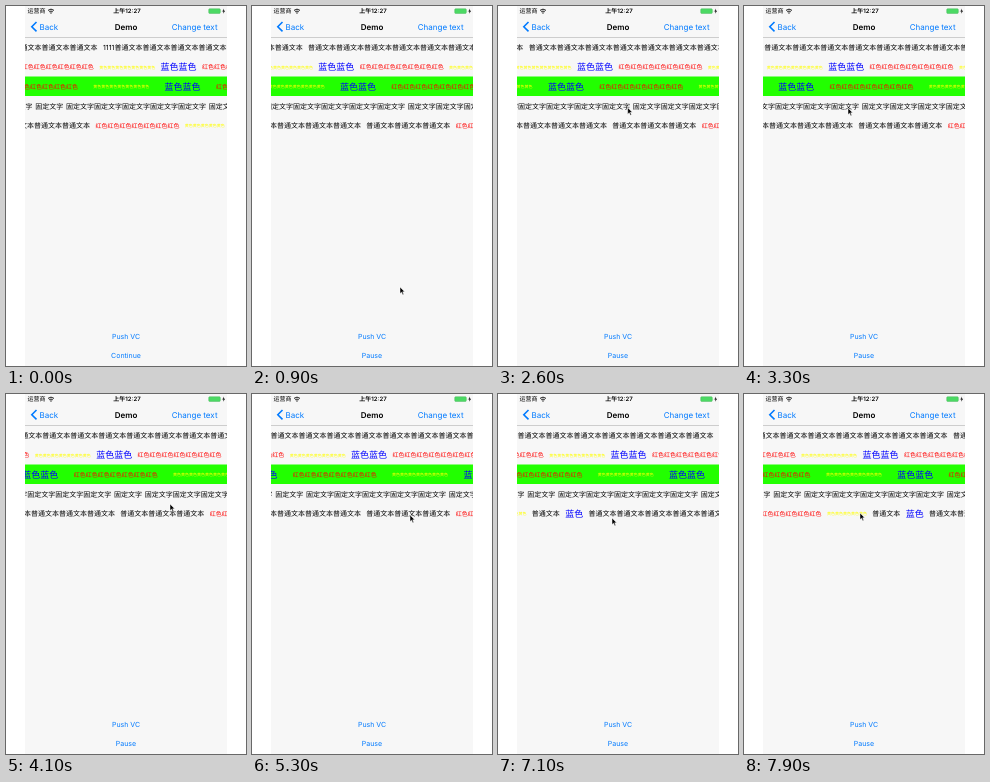
Write an HTML page that moves like this. It is 240 px wide and 360 px high and loops after 8000 ms.

```html
<!DOCTYPE html>
<html lang="zh-CN">
<head>
<meta charset="utf-8">
<style>
html, body { margin: 0; width: 100%; height: 100%; overflow: hidden; background: #fff; }
svg { display: block; width: 240px; height: 360px; }
text { font-family: Inter, "Noto Sans CJK SC", "Noto Sans CJK JP", "Noto Sans CJK", sans-serif; text-rendering: geometricPrecision; white-space: pre; }
.link { fill: #007aff; }
</style>
</head>
<body>
<svg viewBox="0 0 240 360">
  <clipPath id="screen"><rect x="19" width="202" height="360"/></clipPath>
  <g clip-path="url(#screen)">
    <rect x="19" width="202" height="360" fill="#f7f7f7"/>
    <rect x="19" y="31" width="202" height=".6" fill="#b2b2b2"/>
    <rect x="19" y="70.5" width="202" height="19.5" fill="#2f0"/>
    <g id="rows"></g>
    <text x="21.5" y="7.2" font-size="6">运营商</text>
    <g fill="none" stroke="#000" stroke-width=".9">
      <path d="M42 4.4q3-2.6 6 0M43.2 5.8q1.8-1.6 3.6 0"/>
      <circle cx="45" cy="7" r=".3"/>
    </g>
    <text x="121" y="7.2" font-size="6" font-weight="600" text-anchor="middle">上午12:27</text>
    <rect x="202.7" y="2.7" width="11.6" height="4.8" rx="1" fill="#4cd964" stroke="#3fae52" stroke-width=".4"/>
    <path d="M214.8 4.2v1.8q.9-.9 0-1.8" fill="#4cd964"/>
    <path d="M218 2.5l-1.7 3h1.3l-.5 2.3 2-3h-1.4z"/>
    <path d="M30.5 16l-4.7 4.7 4.7 4.7" fill="none" stroke="#007aff" stroke-width="1.6"/>
    <g font-size="8">
      <text class="link" x="33.5" y="23.5">Back</text>
      <text x="120" y="23.5" font-weight="600" text-anchor="middle">Demo</text>
      <text class="link" x="211.5" y="23.5" text-anchor="end">Change text</text>
    </g>
    <g class="link" font-size="7" text-anchor="middle">
      <text x="120" y="333.2">Push VC</text>
      <text id="toggle" x="120" y="352.2"></text>
    </g>
    <path id="cursor" d="M0 0v6.6l1.6-1.4 1.1 2.5 1.1-.5-1.1-2.4h2z" stroke="#fff" stroke-width=".5"/>
  </g>
</svg>
<script>
const $ = id => document.getElementById(id);
const LEFT = 19, LOOP = 8000, STEP = 100, SPEED = 7.46, SWIPE = 750;

function add(parent, tag, attrs) {
  const el = document.createElementNS('http://www.w3.org/2000/svg', tag);
  for (const k in attrs) el.setAttribute(k, attrs[k]);
  return parent.appendChild(el);
}

const words = (str, size, fill) => n => [str.repeat(n), size, fill];
const black = words('普通文本', 7, '#000');
const fixed = words('固定文字', 7, '#000');
const red = words('红色', 6, '#f00');
const yellow = words('黄色', 4, '#ff0');
const blue = words('蓝色', 9, '#00f');

// Endless marquee; returns a setter for the x of its first item, null hides it.
function marquee(cy, gap, items) {
  const row = add($('rows'), 'g', {});
  let x = 0, period;
  for (let copy = 0; copy < 3; copy++) {
    for (const [str, size, fill] of items) {
      const el = add(row, 'text', { x, y: cy + size * .38, 'font-size': size, fill });
      el.textContent = str;
      x += el.getComputedTextLength() + gap;
    }
    period = period || x;
  }
  return pos => {
    const p = ((pos - LEFT) % period + period) % period + LEFT - period;
    row.setAttribute('transform', `translate(${p})`);
    row.style.display = pos === null ? 'none' : '';
  };
}

const plain = marquee(41.2, 5.4, [black(9)]);
const changed = marquee(41.2, 5.4, [['1111' + black(9)[0], 7, '#000']]);
const rightward = marquee(61, 5.4, [blue(2), red(7), yellow(7)]);
const green = marquee(80.4, 15.3, [blue(2), red(7), yellow(7)]);
const dragged = marquee(100, 2.7, [fixed(5), fixed(5), fixed(1)]);
const mixed = marquee(119.6, 5.4, [black(3), red(7), yellow(5), black(1), blue(1), black(7)]);

function ease(u) {
  u = Math.min(1, Math.max(0, u));
  return u * u * (3 - 2 * u);
}

// Sum of equal-length swipes, each [start, distance].
const swiped = (list, t) =>
  list.reduce((sum, [from, dist]) => sum + dist * ease((t - from) / SWIPE), 0);

const draggedSwipes = [[2200, -38], [3300, 163.7], [4400, -84.7], [5400, 6]];
const mixedSwipes = [[5400, 82.7], [6300, 95], [7100, 94.5]];

// Pointer stops as [time, x, y].
const stops = [
  [900, 148, 281], [1800, 161, 101], [3300, 104, 102], [4100, 164, 110],
  [5300, 158, 121], [6300, 112, 129], [7900, 116, 119]
];

function pointer(t) {
  const i = Math.max(1, stops.findIndex(s => s[0] >= t));
  const [t0, x0, y0] = stops[i - 1], [t1, x1, y1] = stops[i];
  const e = ease((t - t0) / (t1 - t0));
  return [x0 + (x1 - x0) * e, y0 + (y1 - y0) * e];
}

function draw(t) {
  const paused = t < STEP, moved = (t - 1800) / 1000 * SPEED;
  plain(paused ? null : 42.6 - 2 * moved);
  changed(paused ? 97 : null);
  rightward(paused ? 154.6 : 73 + moved);
  green(paused ? 158.6 : 67.8 - 3 * moved);
  dragged(paused ? 60 : 13 + swiped(draggedSwipes, t));
  mixed(paused ? 0 : 114.3 + swiped(mixedSwipes, t));
  $('toggle').textContent = paused ? 'Continue' : 'Pause';
  $('cursor').style.display = paused ? 'none' : '';
  $('cursor').setAttribute('transform', `translate(${pointer(t)})`);
}

const start = performance.now();
function frame() {
  const t = (performance.now() - start) % LOOP;
  draw(Math.floor(t / STEP) * STEP);
  requestAnimationFrame(frame);
}
frame();
</script>
</body>
</html>
```
